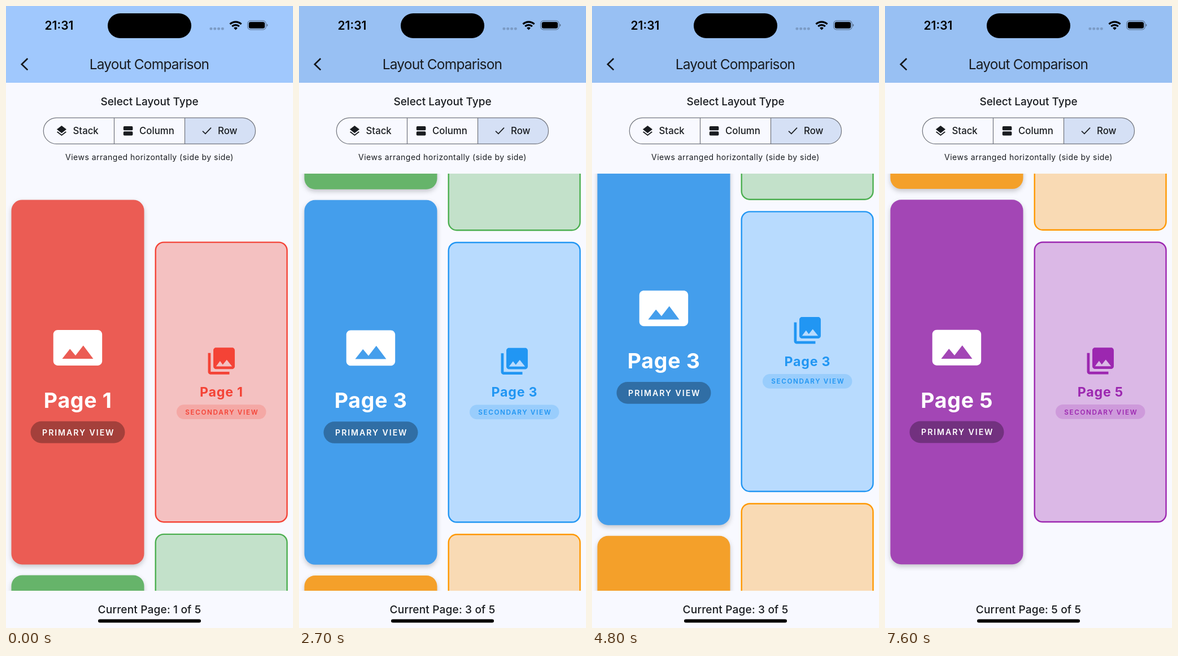
Write an HTML page that moves like this. It is 508x1102 px and loops after 7.7 s.

```html
<!DOCTYPE html>
<html lang="en">
<head>
<meta charset="utf-8">
<title>Layout Comparison</title>
<style>
  html, body { margin: 0; width: 100%; height: 100%; overflow: hidden; background: #f8f9ff; }
  svg { display: block; width: 100vw; height: 100vh; font-family: Inter, Roboto, sans-serif; }
  text { fill: #191c20; }
  .mid { text-anchor: middle; }
  .medium { font-weight: 500; }
  .option { font-size: 16.8px; font-weight: 500; }
  .primary { filter: drop-shadow(0 4px 4px rgba(0, 0, 0, .2)); }
  .primary-title { font-size: 37.5px; font-weight: 700; letter-spacing: .7px; fill: #fff; }
  .primary-tag { font-size: 14.2px; font-weight: 600; letter-spacing: 1.9px; fill: #fff; }
  .secondary-title { font-size: 23.2px; font-weight: 700; letter-spacing: .8px; }
  .secondary-tag { font-size: 11.7px; font-weight: 600; letter-spacing: 1.65px; }
</style>
</head>
<body>
<svg viewBox="0 0 508 1102" preserveAspectRatio="none">
  <defs>
    <clipPath id="viewport"><rect y="297" width="508" height="739"/></clipPath>
    <path id="panorama" d="M23 18V6c0-1.1-.9-2-2-2H3c-1.1 0-2 .9-2 2v12c0 1.1.9 2 2 2h18c1.1 0 2-.9 2-2zM8.5 12.5l2.5 3.01L14.5 11l4.5 6H5l3.5-4.5z"/>
    <path id="library" d="M22 16V4c0-1.1-.9-2-2-2H8c-1.1 0-2 .9-2 2v12c0 1.1.9 2 2 2h12c1.1 0 2-.9 2-2zm-11-4l2.03 2.71L16 11l4 5H8l3-4zM2 6v14c0 1.1.9 2 2 2h14v-2H4V6H2z"/>
  </defs>
  <rect width="508" height="1102" fill="#f8f9ff"/>

  <g clip-path="url(#viewport)">
    <g id="left"></g>
    <g id="right"></g>
  </g>

  <!-- Status and title bar -->
  <rect id="header" width="508" height="136"/>
  <text x="68.5" y="42" font-size="21" font-weight="600" style="fill:#000">21:31</text>
  <rect x="180" y="13" width="148" height="44" rx="22"/>
  <g fill="#7b9bc5">
    <rect x="360.5" y="38" width="4.8" height="4.4" rx="1.6"/>
    <rect x="367.3" y="38" width="4.8" height="4.4" rx="1.6"/>
    <rect x="374.1" y="38" width="4.8" height="4.4" rx="1.6"/>
    <rect x="380.9" y="38" width="4.8" height="4.4" rx="1.6"/>
  </g>
  <g fill="none" stroke="#000" stroke-width="3.2">
    <path d="M396.5 32.2a14.2 14.2 0 0 1 20 0M400.2 36.2a9 9 0 0 1 12.6 0"/>
  </g>
  <path d="M406.5 42.5l-3.4-3.5a4.8 4.8 0 0 1 6.8 0z"/>
  <rect x="427.7" y="26.2" width="32.4" height="15.6" rx="5" fill="none" stroke="#000" stroke-opacity=".4" stroke-width="1.2"/>
  <rect x="429.7" y="28.2" width="28.4" height="11.6" rx="3.3"/>
  <path d="M461.6 31.4q1.8 .9 1.8 2.6t-1.8 2.6z" fill-opacity=".45"/>
  <path d="M38.3 93L27.8 103.2L38.3 113.4" fill="none" stroke="#15181d" stroke-width="2.7"/>
  <text class="mid" x="253.5" y="112" font-size="24.5" letter-spacing="-.8">Layout Comparison</text>

  <!-- Layout selector -->
  <text class="mid medium" x="254" y="176.3" font-size="19">Select Layout Type</text>
  <path d="M316.5 198h102a23.2 23.2 0 0 1 0 46.4h-102z" fill="#d5e0f5"/>
  <g fill="none" stroke="#74777f" stroke-width="1.25">
    <rect x="66.3" y="198" width="375.2" height="46.4" rx="23.2"/>
    <path d="M191.5 198v46.4M316.5 198v46.4"/>
  </g>
  <g fill="#191c20">
    <path transform="translate(87.1 210.1) scale(.947)" d="M11.99 18.54l-7.37-5.73L3 14.07l9 7 9-7-1.63-1.27-7.38 5.74zM12 16l7.36-5.73L21 9l-9-7-9 7 1.63 1.27L12 16z"/>
    <rect x="207.8" y="213" width="16.6" height="7.3" rx="1.9"/>
    <rect x="207.8" y="222.2" width="16.6" height="7.3" rx="1.9"/>
  </g>
  <path d="M348 221.6l4.9 4.8L363 215.7" fill="none" stroke="#191c20" stroke-width="1.7"/>
  <text class="option" x="118.5" y="227.2">Stack</text>
  <text class="option" x="236" y="227.2">Column</text>
  <text class="option" x="375" y="227.2">Row</text>
  <text class="mid" x="254" y="273.2" font-size="14" letter-spacing=".48">Views arranged horizontally (side by side)</text>

  <!-- Footer -->
  <text id="status" class="mid medium" x="254" y="1076" font-size="19.1" letter-spacing=".15"></text>
  <rect x="163" y="1086.6" width="182" height="6" rx="3"/>
</svg>
<script>
const LOOP = 7700, STEP = 100;
const LEFT_PITCH = 665.1, RIGHT_PITCH = 517.3;

// accent, primary fill, secondary fill
const themes = [
  ['#f44336', '#eb5c54', '#f4c1c1'],
  ['#4caf50', '#66b46a', '#c3e1ca'],
  ['#2196f3', '#449eec', '#b8dbfe'],
  ['#ff9800', '#f4a02a', '#f9dab4'],
  ['#9c27b0', '#a346b5', '#dbb8e6'],
];

// start (s), drag duration (s), share of the page dragged, destination
const swipes = [
  [0.73, 0.14, 0.35, 1],
  [1.84, 0.12, 0.45, 2],
  [3.24, 0.31, 0.40, 3],
  [4.43, 0.14, 0.35, 2],
  [5.44, 0.33, 0.425, 3],
  [6.74, 0.12, 0.45, 4.001],
];

const $ = id => document.getElementById(id);

const primaryCard = ([, fill], i) => `
  <g transform="translate(0 ${i * LEFT_PITCH})">
    <rect class="primary" x="9.5" y="343.4" width="235" height="646" rx="19" fill="${fill}"/>
    <use href="#panorama" transform="translate(79.8 558.3) scale(3.93)" fill="#fff"/>
    <text class="mid primary-title" x="127.3" y="712">Page ${i + 1}</text>
    <rect x="43.5" y="735.8" width="167" height="38.6" rx="19.3" fill-opacity=".3"/>
    <text class="mid primary-tag" x="128.3" y="760.6">PRIMARY VIEW</text>
  </g>`;

const secondaryCard = ([accent, , fill], i) => `
  <g transform="translate(0 ${i * RIGHT_PITCH})">
    <rect x="264.7" y="418.6" width="232.8" height="495.6" rx="14.5" fill="${fill}" stroke="${accent}" stroke-width="2.4"/>
    <use href="#library" transform="translate(352.8 600.6) scale(2.37)" fill="${accent}"/>
    <text class="mid secondary-title" x="381.4" y="692" style="fill:${accent}">Page ${i + 1}</text>
    <rect x="302" y="706.2" width="158.4" height="25.8" rx="12.9" fill="${accent}" fill-opacity=".2"/>
    <text class="mid secondary-tag" x="382.2" y="723.7" style="fill:${accent}">SECONDARY VIEW</text>
  </g>`;

$('left').innerHTML = themes.map(primaryCard).join('');
$('right').innerHTML = themes.map(secondaryCard).join('');

// Finger drag, then an overdamped spring that takes over the release speed
function swipeProgress(time, drag, reach) {
  const power = 1.3, slow = 9.07, fast = 22;
  if (time < drag) return reach * (time / drag) ** power;
  const rest = 1 - reach, speed = power * reach / drag;
  const b = (speed - slow * rest) / (fast - slow);
  const s = time - drag;
  const left = (rest - b) * Math.exp(-slow * s) + b * Math.exp(-fast * s);
  return Math.abs(left) < 0.0003 ? 1 : 1 - left;
}

function positionAt(time) {
  let position = 0;
  for (const [start, drag, reach, to] of swipes) {
    if (time < start) break;
    position += (to - position) * swipeProgress(time - start, drag, reach);
  }
  return position;
}

function headerColor(time) {
  const k = Math.min(1, Math.max(0, (time - 0.75) / 0.2));
  const mix = (a, b) => Math.round(a + (b - a) * k);
  return `rgb(${mix(160, 152)}, ${mix(200, 192)}, ${mix(253, 243)})`;
}

function draw(now) {
  const time = Math.floor(now % LOOP / STEP) * STEP / 1000;
  const position = positionAt(time);
  $('left').setAttribute('transform', `translate(0 ${-position * LEFT_PITCH})`);
  $('right').setAttribute('transform', `translate(0 ${-position * RIGHT_PITCH})`);
  $('header').setAttribute('fill', headerColor(time));
  $('status').textContent = `Current Page: ${Math.round(position) + 1} of 5`;
}

const begin = performance.now();
function tick() {
  draw(performance.now() - begin);
  requestAnimationFrame(tick);
}
tick();
</script>
</body>
</html>
```
